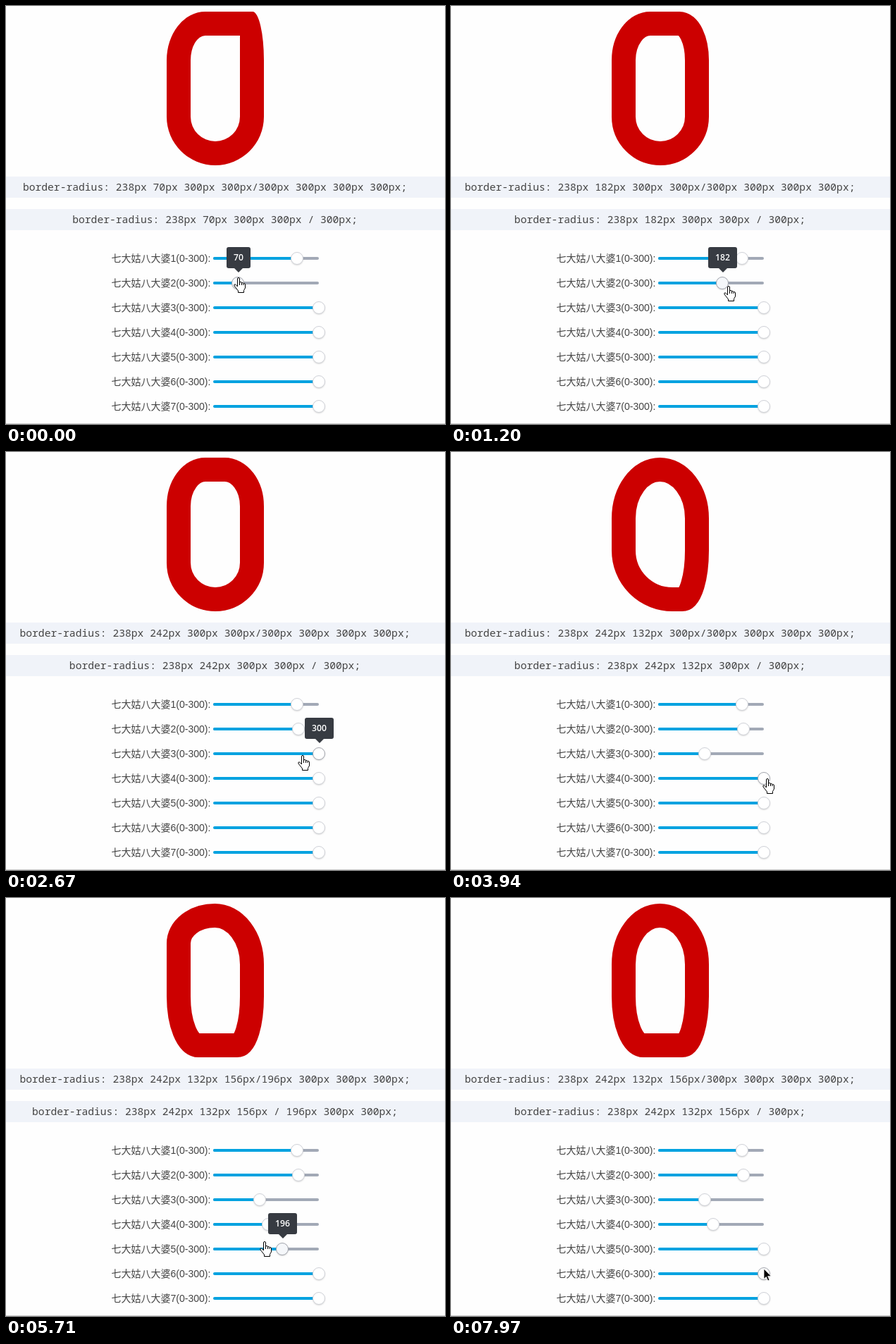
Write an HTML page that moves like this. It is 623 px wide and 593 px high and loops after 8 s.

```html
<!DOCTYPE html>
<html lang="zh">
<head>
<meta charset="utf-8">
<title>border-radius</title>
<style>
html, body { margin: 0; width: 100%; height: 100%; overflow: hidden; background: #fefefe; }
body { position: relative; color: #444; }
body > *, .row > * { position: absolute; box-sizing: border-box; }
#box, #ring { left: 228px; top: 8px; width: 138px; height: 218px; }
#box { border: 34px solid #c00; }
#ring { fill: none; stroke: #c00; stroke-width: 34px; }
.code {
  left: 0; width: 100%; height: 30px; background: #f0f3f9;
  font: 14.66px/29px "Noto Sans Mono", monospace; white-space: pre;
}
.code span { display: block; width: 593px; text-align: center; }
.row { left: 0; width: 100%; height: 0; }
.label { left: 149.5px; top: -10px; font: 14px/20px "Liberation Sans", "Noto Sans CJK SC", sans-serif; white-space: nowrap; }
.track { left: 294px; top: -2px; width: 150px; height: 4px; border-radius: 2px; background: #a2a9b6; overflow: hidden; }
.fill { height: 100%; background: #00a2e0; }
.thumb {
  top: -9px; width: 18px; height: 18px; margin-left: -9px; border-radius: 50%;
  background: #fff; border: 1px solid #d0d2d8; box-shadow: 0 1px 2px rgba(0, 0, 0, .15);
}
.hover .thumb { border-color: #a2a5ad; }
.drag .thumb { background: #f5f7fa; }
#tip {
  height: 30px; border-radius: 3px; background: #373b42; color: #fff;
  font: 600 12.2px/30px "Open Sans", sans-serif; text-align: center;
}
#tip::after {
  content: ""; position: absolute; left: 50%; top: 100%; margin-left: -6px;
  border: 6px solid transparent; border-top-color: #373b42; border-bottom: 0;
}
#cursor { left: 0; top: 0; overflow: visible; }
#line { left: 0; top: 592px; width: 100%; height: 1px; background: #ccc; }
</style>
</head>
<body>
<div id="box"></div>
<svg id="ring"><path id="band"/></svg>
<div class="code" style="top:242px"><span id="full"></span></div>
<div class="code" style="top:288px"><span id="short"></span></div>
<div id="line"></div>
<div id="tip"></div>
<svg id="cursor" width="18" height="23" stroke-linejoin="round">
  <g id="hand" fill="#fff" stroke="#000">
    <path d="M5.5 13V2Q5.5.5 7 .5T8.5 2V7Q10 5.8 11.5 7.2V8Q13 6.8 14.2 8.6Q16.5 8.2 16.5 10V15L14.5 18.5V21.5H6.5V19L1 12Q.2 9.8 2.4 9.8L5.5 13Z"/>
    <path fill="none" d="M8.5 7V11M11.5 8V11M14 9V11"/>
  </g>
  <path id="arrow" fill="#000" stroke="#fff" stroke-width=".8" d="M0 0V14.5L3.3 11.4L5.8 17L8 16L5.6 10.6H10.3Z"/>
</svg>
<script>
const LOOP = 8000, STEP = 140;
const W = 138, H = 218, BORDER = 34;
const $ = id => document.getElementById(id);
const rowY = row => 323 + 35 * row;
const thumbX = value => 294 + value / 2;
const mix = (a, b, p) => a + (b - a) * p;

// pointer moves: start, end, slider, value reached, pointer offset from the thumb
const moves = [
  [0, 0, 2, 70, 1, -8],
  [0, 1200, 2, 182, 9, 4],
  [1200, 1910, 2, 242, 3, 10],
  [2280, 2540, 3, 300, 0, 2],
  [2540, 2670, 3, 300, -23, 2],
  [2670, 3240, 3, 132, 2, 2],
  [3520, 3940, 4, 300, 5, 0],
  [3940, 4480, 4, 156, 4, 0],
  [4630, 5250, 5, 300, 1, -2],
  [5250, 5560, 5, 298, -1, 0],
  [5560, 5710, 5, 196, -25, -11],
  [5710, 6100, 5, 118, 1, -9],
  [6370, 6880, 5, 180, 2, -6],
  [6880, 7410, 5, 300, 2, -4],
  [7680, 7970, 6, 300, 0, -7]
];

// progress of a move, in even jumps of about STEP ms
function progress(t, start, end) {
  if (t >= end) return 1;
  const n = Math.round((end - start) / STEP);
  return Math.floor((t - start) / (end - start) * n) / n;
}

// replay all moves up to time t
function stateAt(t) {
  const s = { values: [238, 70, 300, 300, 300, 300, 300], x: 0, y: 0, row: 2, hover: true, tip: true };
  for (const [start, end, row, value, dx, dy] of moves) {
    const p = t < start ? 0 : progress(t, start, end);
    if (!p) break;
    const drag = row === s.row;
    s.values[row - 1] = Math.round(mix(s.values[row - 1], value, p) / 2) * 2;
    s.x = mix(s.x, thumbX(value) + dx, p);
    s.y = mix(s.y, rowY(row) + dy, p);
    s.hover = drag || p === 1;
    s.tip = drag;
    s.row = row;
  }
  return s;
}

const rows = Array.from({ length: 7 }, (_, i) => {
  const row = document.createElement("div");
  row.className = "row";
  row.style.top = rowY(i + 1) + "px";
  row.innerHTML = `<span class="label">七大姑八大婆${i + 1}(0-300):</span>
    <div class="track"><div class="fill"></div></div><div class="thumb"></div>`;
  document.body.insertBefore(row, $("tip"));
  return { row, fill: row.querySelector(".fill"), thumb: row.querySelector(".thumb") };
});

const px = list => list.map(v => v + "px").join(" ");

function collapse([a, b, c, d]) {
  if (b !== d) return [a, b, c, d];
  if (a !== c) return [a, b, c];
  return a !== b ? [a, b] : [a];
}

// rounded rectangle along the middle of the border
function bandPath(rx, ry) {
  const m = BORDER / 2, r = W - m, b = H - m;
  const [x1, x2, x3, x4] = rx.map(v => v - m);
  const [y1, y2, y3, y4] = ry.map(v => v - m);
  const arc = (a, c, x, y) => `A${a} ${c} 0 0 1 ${x} ${y}`;
  return `M${m + x1} ${m}H${r - x2}` + arc(x2, y2, r, m + y2) +
    `V${b - y3}` + arc(x3, y3, r - x3, b) +
    `H${m + x4}` + arc(x4, y4, m, b - y4) +
    `V${m + y1}` + arc(x1, y1, m + x1, m) + "Z";
}

function drawShape(h, v) {
  const scale = Math.min(1, W / (h[0] + h[1]), W / (h[2] + h[3]), H / (v[0] + v[3]), H / (v[1] + v[2]));
  const rx = h.map(n => n * scale), ry = v.map(n => n * scale);
  // wide corners are stroked at even thickness, tight ones use the plain border
  const stroked = Math.min(...rx, ...ry) >= BORDER;
  $("ring").style.display = stroked ? "block" : "none";
  $("box").style.display = stroked ? "none" : "block";
  if (stroked) $("band").setAttribute("d", bandPath(rx, ry));
  else $("box").style.borderRadius = px(h) + "/" + px(v);
}

function drawTip(row, value) {
  const tip = $("tip"), width = 20 + 7 * String(value).length;
  tip.textContent = value;
  tip.style.width = width + "px";
  tip.style.left = Math.round(thumbX(value) + .5 - width / 2) + "px";
  tip.style.top = rowY(row) - 51 + "px";
}

function draw(t) {
  const { values, x, y, row, hover, tip } = stateAt(t);
  const h = values.slice(0, 4), v = [...values.slice(4), 300];
  drawShape(h, v);
  $("full").textContent = `border-radius: ${px(h)}/${px(v)};`;
  $("short").textContent = `border-radius: ${px(collapse(h))} / ${px(collapse(v))};`;

  rows.forEach((r, i) => {
    const on = hover && row === i + 1;
    r.fill.style.width = values[i] / 2 + "px";
    r.thumb.style.left = thumbX(values[i]) + "px";
    r.row.classList.toggle("hover", on);
    r.row.classList.toggle("drag", on && tip && values[i] < 300);
  });

  $("tip").style.display = tip ? "block" : "none";
  if (tip) drawTip(row, values[row - 1]);

  const arrow = row === 6;
  $("hand").style.display = arrow ? "none" : "";
  $("arrow").style.display = arrow ? "" : "none";
  $("cursor").style.transform = `translate(${Math.round(x) - (arrow ? 0 : 7)}px, ${Math.round(y)}px)`;
}

const start = performance.now();
function frame() {
  draw((performance.now() - start) % LOOP);
  requestAnimationFrame(frame);
}
frame();
</script>
</body>
</html>
```
